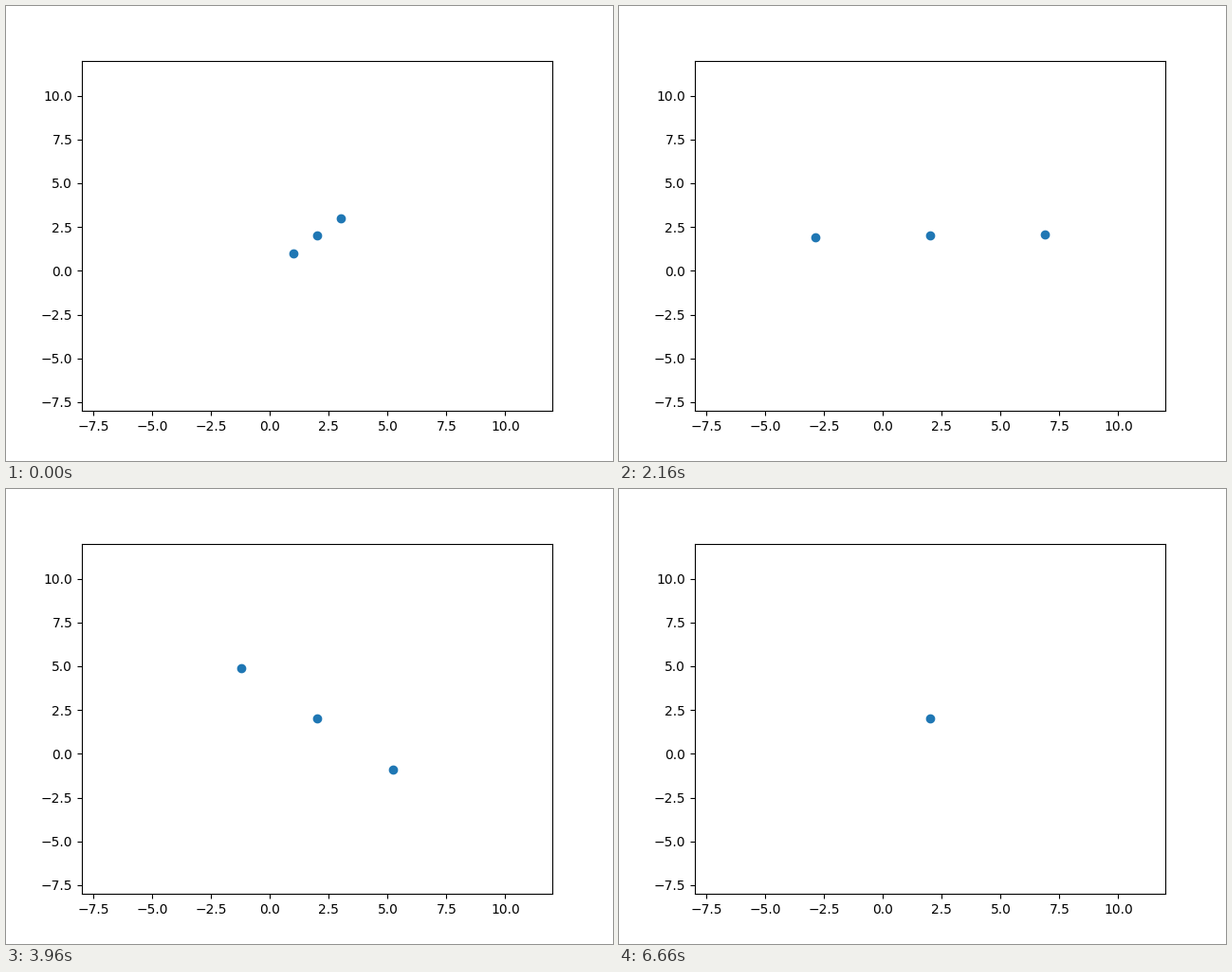
A matplotlib script for the animation above (8 s loop, 640 by 480 pixels).

```python
import numpy as np
import matplotlib.pyplot as plt
from matplotlib.animation import FuncAnimation

LOOP_MS, INTERVAL, POSE_MS = 8000, 20, 30
DT, SUBSTEPS = 0.01, 25


def gravity(pos):
    """Acceleration of unit masses with G = 1."""
    gap = pos[None, :, :] - pos[:, None, :]
    dist = np.hypot(gap[..., 0], gap[..., 1])
    np.fill_diagonal(dist, 1)
    return (gap / dist[..., None] ** 3).sum(axis=1)


def simulate(poses):
    """Forward Euler track of the three bodies, one entry per pose."""
    pos = np.array([[1.0, 1.0], [2.0, 2.0], [3.0, 3.0]])
    vel = np.array([[1.0, 0.0], [0.0, 0.0], [-1.0, 0.0]])
    track = [pos]
    for _ in range(poses - 1):
        for _ in range(SUBSTEPS):
            pos, vel = pos + vel * DT, vel + gravity(pos) * DT
        track.append(pos)
    return track


track = simulate(LOOP_MS // POSE_MS + 1)

fig, ax = plt.subplots(figsize=(6.4, 4.8), dpi=100)
ax.set_xlim(-8, 12)
ax.set_ylim(-8, 12)
bodies, = ax.plot([], [], 'o')


def update(i):
    # nearest pose to this tick
    pose = (i * INTERVAL + POSE_MS // 3) // POSE_MS
    bodies.set_data(*track[pose].T)
    return bodies,


anim = FuncAnimation(fig, update, frames=LOOP_MS // INTERVAL,
                     interval=INTERVAL, repeat=True, repeat_delay=0)
plt.show()
```
